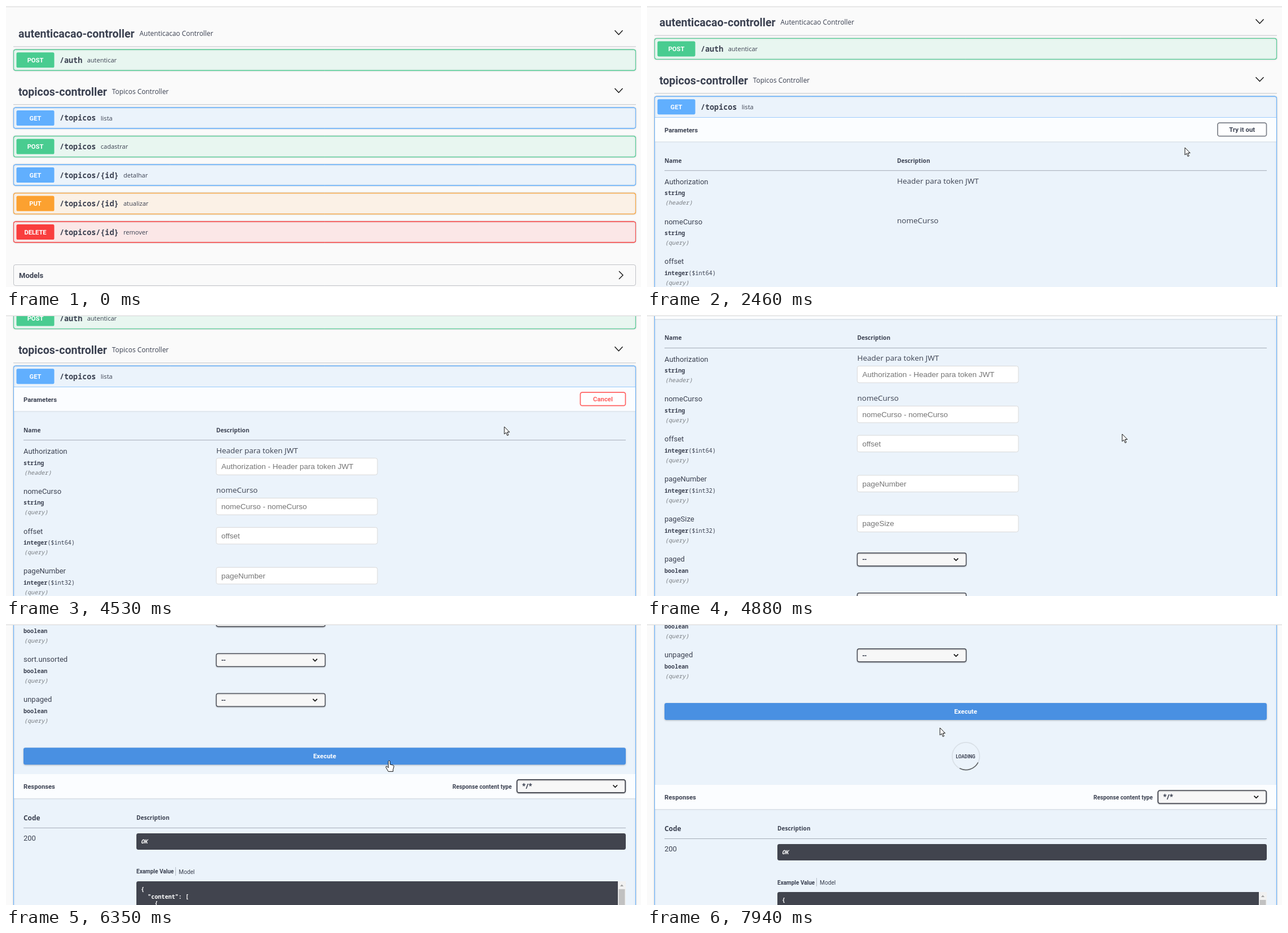
Animation of 1125x498 px, one loop 8 s. Source, as an HTML page with a canvas:

```html
<!DOCTYPE html>
<html lang="pt">
<head>
<meta charset="utf-8">
<title>API docs</title>
<style>
html, body { margin: 0; width: 100%; height: 100%; overflow: hidden; background: #fafafa; }
canvas { display: block; width: 1125px; height: 498px; }
</style>
</head>
<body>
<canvas id="stage" width="1125" height="498"></canvas>
<script>
const ctx = document.getElementById('stage').getContext('2d');
const LOOP = 8000, INK = '#3b4151', RULE = 'rgba(59,65,81,.4)';
const FACE = {
  title: ['700', 'Roboto, sans-serif'],
  label: ['400', 'Roboto, sans-serif'],
  body: ['400', '"Open Sans", sans-serif'],
  bodyBold: ['700', '"Open Sans", sans-serif'],
  mono: ['400', '"Noto Sans Mono", monospace'],
  monoBold: ['600', '"Noto Sans Mono", monospace'],
  monoItalic: ['italic 400', '"Noto Sans Mono", monospace'],
  monoStrong: ['italic 700', '"Noto Sans Mono", monospace'],
  input: ['400', '"Liberation Sans", Arial, sans-serif']
};
const COLOR = { GET: '#61affe', POST: '#49cc90', PUT: '#fca130', DELETE: '#f93e3e' };
const PARAMS = [
  ['Authorization', 'string', 'Header para token JWT'],
  ['nomeCurso', 'string', 'nomeCurso'],
  ['offset', 'integer($int64)'],
  ['pageNumber', 'integer($int32)'],
  ['pageSize', 'integer($int32)'],
  ['paged', 'boolean'],
  ['sort.sorted', 'boolean'],
  ['sort.unsorted', 'boolean'],
  ['unpaged', 'boolean']
];
const SAMPLE = ['{', '  "content": [', '    {',
  '      "dataCriacao": "2020-08-19T00:00:00.000Z",', '      "id": 0,',
  '      "mensagem": "string",', '      "titulo": "string"', '    }', '  ],',
  '  "empty": true,', '  "first": true,', '  "last": true,', '  "number": 0,'];

const WHEEL = [2398, 4500, 4640, 5040, 5290, 5525, 5780, 5960, 6140, 6321];
const NOTCH = 84.33;
const CLICKS = [[880, 1020], [3440, 3570], [7120, 7250]];
const OPEN_AT = 1185, TRY_AT = 3570, LOAD_AT = 7250;
// time, x, y of the pointer tip
const POINTER = [
  [0, 640, 530], [70, 632, 490], [750, 544, 195], [1760, 544, 195],
  [2390, 953, 251], [2530, 953, 251], [3230, 1045, 154], [3900, 1045, 154],
  [4190, 1030, 166], [4330, 883, 198], [4530, 883, 198], [4880, 842, 211],
  [5660, 734, 235], [6350, 679, 242], [6980, 545, 158], [7250, 545, 158],
  [7870, 519, 184], [8000, 519, 184]
];

let hot = [];

const clamp = v => Math.min(1, Math.max(0, v));
const smooth = v => { v = clamp(v); return v * v * (3 - 2 * v); };

function text(s, x, y, size, face, color = INK, align = 'left') {
  const [weight, family] = FACE[face];
  ctx.font = `${weight} ${size}px ${family}`;
  ctx.fillStyle = color;
  ctx.textAlign = align;
  ctx.fillText(s, x, y + size * 0.355);
  return ctx.measureText(s).width;
}

function rect(x, y, w, h, fill) {
  ctx.fillStyle = fill;
  ctx.fillRect(x, y, w, h);
}

function box(x, y, w, h, fill, stroke, line = 1, r = 3.4) {
  ctx.beginPath();
  ctx.roundRect(x, y, w, h, r);
  if (fill) { ctx.fillStyle = fill; ctx.fill(); }
  if (stroke) { ctx.strokeStyle = stroke; ctx.lineWidth = line; ctx.stroke(); }
}

function shadowed(blur, dy, alpha, draw) {
  ctx.save();
  ctx.shadowColor = `rgba(0,0,0,${alpha})`;
  ctx.shadowBlur = blur;
  ctx.shadowOffsetY = dy;
  draw();
  ctx.restore();
}

function polyline(points, color, width) {
  ctx.beginPath();
  points.forEach(p => ctx.lineTo(...p));
  ctx.strokeStyle = color;
  ctx.lineWidth = width;
  ctx.stroke();
}

const chevron = (x, y, w, h, width, color = '#111') =>
  polyline([[x - w, y - h], [x, y + h], [x + w, y - h]], color, width);

function section(name, title, y) {
  const w = text(name, 22, y, 19.5, 'title');
  text(title, 22 + w + 9, y, 11.9, 'body');
  chevron(1085.5, y - 2, 7, 3.7, 1.4);
  rect(13, y + 22.5, 1103, 1, 'rgba(59,65,81,.3)');
}

function operation(method, path, summary, y, extra = 0) {
  const color = COLOR[method];
  shadowed(3, 0, 0.19, () => box(13.5, y, 1102, 37 + extra, '#fafafa', color));
  box(13.5, y, 1102, 37 + extra, color + '1a', color);
  box(18.5, y + 5, 67, 27, color, null, 0, 2.6);
  text(method, 52, y + 18.7, 11.2, 'title', '#fff', 'center');
  const w = text(path, 95, y + 18.7, 13.4, 'monoBold');
  text(summary, 95 + w + 8.5, y + 18.7, 11.05, 'body');
  hot.push([13, y, 1116, y + 37]);
}

function band(y) {
  shadowed(2, 1, 0.12, () => rect(14, y, 1101, 43, '#fbfdff'));
}

function button(label, right, y, width, color) {
  box(right - width, y, width, 23.5, 'rgba(255,255,255,.7)', color, 1.7);
  text(label, right - width / 2, y + 11.7, 11.4, 'title', color === '#ff6060' ? color : INK, 'center');
  hot.push([right - width, y, right, y + 24]);
}

function select(label, x, cy, width, line = 1.3) {
  shadowed(2, 1, 0.25, () => box(x, cy - 11.5, width, 23, '#f7f7f7', '#41444e', line));
  text(label, x + 9, cy, 11.9, 'bodyBold');
  chevron(x + width - 18, cy, 3.8, 1.9, 1.7);
}

function parameter([name, type, description], i, editing) {
  const y = 331 + i * 70.85, x = editing ? 372.5 : 443;
  const [base, format] = type.split(/(?=\()/);
  text(name, 31, y, 13, 'label');
  const w = text(base, 31, y + 20.7, 10.1, 'monoBold');
  if (format) text(format, 31 + w, y + 20.7, 10.1, 'mono');
  text(i ? '(query)' : '(header)', 32, y + 37.7, 10.1, 'monoItalic', '#777b80');
  if (description) text(description, x, y - 1.4, 13.5, 'body');
  if (!editing) return;
  if (base === 'boolean') return select('--', x, y + 1, 193);
  const cy = y + (description ? 27.5 : 8.5);
  box(x, cy - 15, 285.5, 29.5, '#fff', '#d9d9d9');
  text(description ? `${name} - ${description}` : name, x + 9, cy - 0.3, 13.5, 'input', '#757575');
}

function spinner(t) {
  const middle = (72 + (t - 7940) * 0.36) * Math.PI / 180;
  ctx.save();
  ctx.globalAlpha = smooth((t - LOAD_AT) / 400);
  ctx.lineWidth = 1.7;
  for (const [from, to, color] of [[0, 2 * Math.PI, 'rgba(85,85,85,.12)'],
    [middle - Math.PI / 4, middle + Math.PI / 4, 'rgba(0,0,0,.55)']]) {
    ctx.beginPath();
    ctx.arc(565, 1077.5, 24.3, from, to);
    ctx.strokeStyle = color;
    ctx.stroke();
  }
  text('LOADING', 564.5, 1078, 8.2, 'title', INK, 'center');
  ctx.restore();
}

function responses(y) {
  band(y);
  text('Responses', 31, y + 22, 11.3, 'title');
  text('Response content type', 896, y + 22, 10.2, 'title', INK, 'right');
  select('*/*', 905.3, y + 21.5, 192, 1.7);
  text('Code', 31, y + 77.5, 11.9, 'bodyBold');
  text('Description', 231, y + 77.5, 10.2, 'bodyBold');
  rect(31, y + 95, 1067, 1, RULE);
  text('200', 31, y + 113, 13, 'label');
  box(231, y + 105, 867, 29, '#41444e');
  text('OK', 239, y + 119.5, 10.2, 'monoStrong', '#fff');
  text('Example Value', 231, y + 173, 10, 'title');
  rect(300, y + 165, 1, 15, 'rgba(59,65,81,.3)');
  text('Model', 306, y + 173, 10.2, 'label');
  box(231, y + 190, 867, 330, '#41444e');
  rect(1084, y + 190, 14, 330, '#f1f1f1');
  rect(1085.5, y + 204, 11, 120, '#c1c1c1');
  ctx.beginPath();
  [[1088, 199], [1091, 195.5], [1094, 199]].forEach(([px, py]) => ctx.lineTo(px, y + py));
  ctx.fillStyle = '#a0a0a0';
  ctx.fill();
  SAMPLE.forEach((line, i) => text(line, 239, y + 204.5 + i * 12.7, 10.1, 'monoBold', '#fff'));
}

function details(t, height) {
  const editing = t >= TRY_AT, loading = t >= LOAD_AT;
  ctx.save();
  ctx.beginPath();
  ctx.rect(13, 217, 1103, height);
  ctx.clip();
  band(217);
  rect(14, 216.6, 1101, 1, COLOR.GET);
  text('Parameters', 31, 239.5, 11.3, 'title');
  if (editing) button('Cancel', 1097.5, 227, 80, '#ff6060');
  else button('Try it out', 1097.5, 227, 86.5, '#7b7f88');
  text('Name', 31, 293.8, 10.2, 'bodyBold');
  text('Description', editing ? 372.5 : 443, 293.8, 10.2, 'bodyBold');
  rect(31, 311, 1067, 1, RULE);
  PARAMS.forEach((p, i) => parameter(p, i, editing));
  if (editing) {
    shadowed(3, 1, 0.25, () => box(31, 983.3, 1067, 30, '#4990e2'));
    text('Execute', 564.5, 998.5, 11.4, 'title', '#fff', 'center');
    hot.push([31, 983, 1098, 1013]);
  }
  if (loading) spinner(t);
  responses(loading ? 1128.3 : 1030);
  ctx.restore();
}

function pointer(t, scroll) {
  const i = POINTER.findIndex(p => p[0] > t);
  const [t0, x0, y0] = POINTER[i - 1], [t1, x1, y1] = POINTER[i];
  const k = (t - t0) / (t1 - t0);
  const x = x0 + (x1 - x0) * k, y = y0 + (y1 - y0) * k, py = y + scroll;
  const hand = hot.some(([l, top, r, b]) => x >= l && x <= r && py >= top && py <= b);
  if (CLICKS.some(([from, to]) => t >= from && t < to)) {
    ctx.beginPath();
    ctx.arc(x, y + 1, 8.7, 0, 2 * Math.PI);
    ctx.fillStyle = 'rgba(255,240,0,.75)';
    ctx.fill();
  }
  const shape = new Path2D(hand
    ? 'M-1.5 1.3Q0 -.8 1.5 1.3V7L7 8.3Q8.5 8.8 8.4 11L7 16V19.5H-1.5L-5.8 12Q-6 9.5 -3.6 10.5L-1.5 13Z'
    : 'M0 0V13L3 10.3L5.2 15.6L7.3 14.7L5.1 9.5H9.2Z');
  ctx.save();
  ctx.translate(x, y);
  ctx.fillStyle = '#fff';
  ctx.strokeStyle = '#111';
  ctx.lineWidth = 1;
  ctx.fill(shape);
  ctx.stroke(shape);
  ctx.restore();
}

function draw(t) {
  const scroll = NOTCH * WHEEL.reduce((sum, at) => sum + smooth((t - at) / 200), 0);
  const extra = 1450 * clamp((t - OPEN_AT) / 245) ** 1.6;
  hot = [];
  rect(0, 0, 1125, 498, '#fafafa');
  ctx.save();
  ctx.translate(0, -scroll);
  section('autenticacao-controller', 'Autenticacao Controller', 49);
  operation('POST', '/auth', 'autenticar', 77.3);
  section('topicos-controller', 'Topicos Controller', 151.7);
  operation('GET', '/topicos', 'lista', 180, extra);
  if (extra) details(t, extra);
  [['POST', '/topicos', 'cadastrar'], ['GET', '/topicos/{id}', 'detalhar'],
    ['PUT', '/topicos/{id}', 'atualizar'], ['DELETE', '/topicos/{id}', 'remover']]
    .forEach((op, i) => operation(...op, 230.6 + i * 50.5 + extra));
  box(13.5, 458.5 + extra, 1102, 37, null, 'rgba(59,65,81,.3)');
  text('Models', 23, 477.5 + extra, 13, 'title');
  polyline([[1086, 470], [1093, 477], [1086, 484]].map(([x, y]) => [x, y + extra]), '#111', 1.4);
  ctx.restore();
  rect(0, 0, 1125, 2, '#fafafa');
  rect(0, 1, 1125, 1, '#d9d9d9');
  pointer(t, scroll);
}

function tick() {
  draw(performance.now() % LOOP);
  requestAnimationFrame(tick);
}
tick();
</script>
</body>
</html>
```
